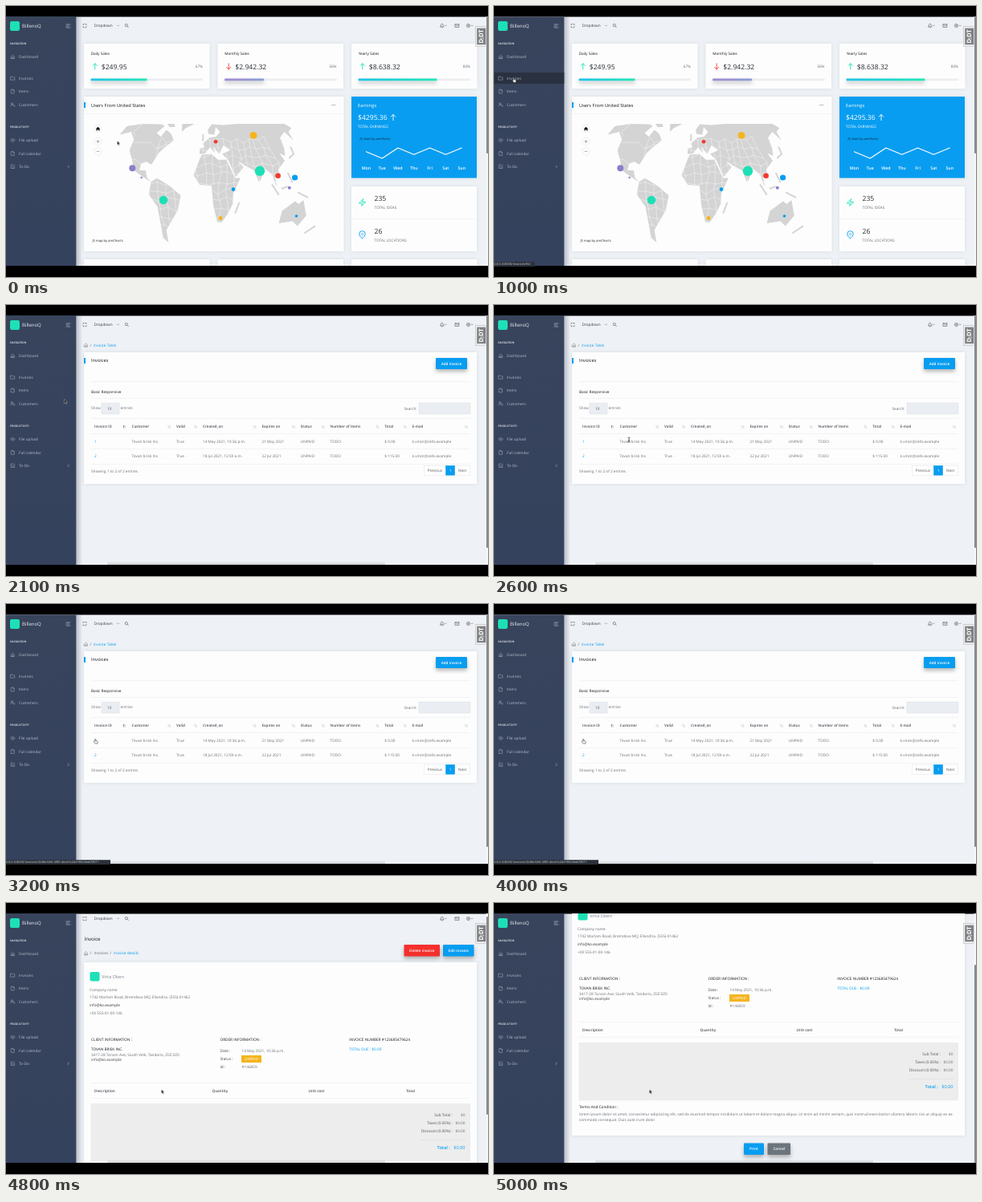
Animation of 600x338 px, one loop 5100 ms. Source, as an HTML page:

```html
<!DOCTYPE html>
<html lang="en">
<head>
<meta charset="utf-8">
<title>Invoice dashboard</title>
<style>
html, body { margin: 0; width: 100%; height: 100%; overflow: hidden; background: #000; }
svg { display: block; width: 600px; height: 338px; font-family: "Open Sans", "Noto Sans", sans-serif; text-rendering: geometricPrecision; }
text { white-space: pre; }
.anim { animation: 5100ms step-end infinite; }
.glow { filter: drop-shadow(0 3px 2.5px rgba(0, 0, 0, .28)); }
.card { filter: drop-shadow(0 .5px 2.5px rgba(69, 90, 100, .12)); }
#top { animation-name: top; }
#scroll { animation-name: scroll; }
#bar { animation-name: bar; }
#pointer { animation-name: move; }
@keyframes top {
  0% { transform: none } 94.117% { transform: translateY(-5px) }
  96.078% { transform: translateY(-43px) } 98.039%, 100% { transform: translateY(-81px) }
}
@keyframes scroll {
  0% { transform: translateY(5px) } 94.117% { transform: none }
  96.078% { transform: translateY(-38px) } 98.039%, 100% { transform: translateY(-76px) }
}
@keyframes bar {
  0% { transform: none } 94.117% { transform: translateY(4px) }
  96.078% { transform: translateY(34px) } 98.039%, 100% { transform: translateY(64px) }
}
@keyframes move {
  0% { transform: translate(138.5px, 168.3px); animation-timing-function: steps(6) }
  11.764% { transform: translate(25px, 92.3px) }
  37.254% { transform: translate(25px, 92.3px); animation-timing-function: steps(6) }
  49.019% { transform: translate(168px, 168px) }
  50.98% { transform: translate(168px, 168px); animation-timing-function: steps(4) }
  58.823% { transform: translate(111.5px, 171px) }
  86.274% { transform: translate(111.5px, 171px); animation-timing-function: steps(4) }
  94.117%, 100% { transform: translate(193.5px, 232.6px) }
}
</style>
</head>
<body>
<svg id="stage" viewBox="0 0 600 338"></svg>
<script>
const LOOP = 5100, BODY = 4.72;
const BLUE = "#089df0", TEAL = "#1de0b6", RED = "#f23a2f", VIOLET = "#8e7cc9", GOLD = "#f4b41f";
const INK = "#15181d", GREY = "#6a6f77", PALE = "#e6e8ec", DARK = "#4b5058";
const BOLD = 'font-weight="600"', MID = 'text-anchor="middle"', END = 'text-anchor="end"';

// y is the middle of the capitals
const text = (x, y, s, fill = GREY, size = BODY, extra = "") =>
  `<text x="${x}" y="${(y + size * .355).toFixed(2)}" font-size="${size}" fill="${fill}" ${extra}>${s}</text>`;
const rect = (x, y, w, h, fill, extra = "") =>
  `<rect x="${x}" y="${y}" width="${w}" height="${h}" fill="${fill}" ${extra}/>`;
const line = (d, color, w = .6, extra = "") =>
  `<path d="${d}" fill="none" stroke="${color}" stroke-width="${w}" stroke-linecap="round" stroke-linejoin="round" ${extra}/>`;
const dot = (x, y, r, fill, extra = "") => `<circle cx="${x}" cy="${y}" r="${r}" fill="${fill}" ${extra}/>`;
const ring = (x, y, r, color) => dot(x, y, r, "none", `stroke="${color}" stroke-width=".6"`);
const each = (list, draw) => list.map(draw).join("");
const rule = (y, x = 106, end = 578) => rect(x, y, end - x, .5, PALE);
const card = (x, y, w, h, fill = "#fdfdfd") => rect(x, y, w, h, fill, 'class="card"');
const group = (id, s) => `<g id="${id}" class="anim">${s}</g>`;
const button = (x, y, w, h, s, fill) =>
  rect(x, y, w, h, fill, 'rx=".8" class="glow"') + text(x + w / 2, y + h / 2, s, "#fff", 4.6, `${MID} ${BOLD}`);
const arrow = (x, y, up, color) => {
  const k = up ? 1 : -1;
  return line(`M${x} ${y + 3.6 * k}V${y - 3.6 * k}M${x - 2.7} ${y - .9 * k}l2.7 ${-2.7 * k}l2.7 ${2.7 * k}`, color, .9);
};
const home = (x, y, c) => line(`M${x - 2} ${y - .3}l2 -1.9l2 1.9v2.5h-4zM${x - .6} ${y + 2.2}v-1.8h1.2v1.8`, c, .5);
const caret = x => line(`M${x - 1} 24l1 1l1 -1`, GREY);
const bigNumber = (x, y, s, fill = "#2a2e35") => text(x, y, s, fill, 8.6);
const scrollbar = h => rect(597.6, 13, 2.4, 312, "#f6f7f9") + group("bar", rect(598, 13, 2, h, "#85888e", 'rx=".9"'));

// visible spans in ms
const spans = {
  dash: [0, 1500], list: [1500, 4500], raw: [1500, 2000], grid: [2000, 4500], detail: [4500, LOOP],
  edge: [1500, LOOP], tool: [0, 1500, 2000, LOOP], hover: [500, 1500], url1: [600, 1500], url2: [3000, 4500],
  arrow: [0, 500, 2000, 2400, 4500, LOOP], hand: [500, 2000, 2900, 4500], beam: [2400, 2900]
};
const showRule = ([id, times]) => {
  const stops = each(times, (t, i) => `${Math.max(0, t / LOOP * 100 - .001).toFixed(3)}% { visibility: ${i % 2 ? "hidden" : "visible"} }`);
  return `#${id} { animation-name: ${id} } @keyframes ${id} { 0% { visibility: hidden } ${stops} }`;
};
document.head.appendChild(document.createElement("style")).textContent = each(Object.entries(spans), showRule);

// sidebar
const folder = "M-2.4 -2h2l.8 .9h2v3.3h-4.8z";
const sheet = "M-1.8 -2.4h2.3l1.3 1.3v3.5h-3.6zM.5 -2.4v1.3h1.3";
const people = "M-2.8 2q0 -2 2 -2q2 0 2 2M-1.9 -1.2a1.1 1.1 0 1 0 2.2 0a1.1 1.1 0 1 0 -2.2 0M1.6 .2q1.2 .3 1.2 1.8";
const cloud = "M-1.8 1q-1.4 -.5 -.6 -2q.9 -1.6 2.6 -.6q1.9 -.4 2.3 1.2q.2 1.1 -.8 1.4M0 2.3v-2.6m-1 .9l1 -1l1 1";
const check = "M2.2 0v2h-4.4v-4.4h3M-1.2 -.4l1.2 1.2l2.6 -2.8";
const menu = [["Invoices", 90, folder], ["Items", 106.5, sheet], ["Customers", 123, people],
  ["File upload", 167.5, cloud], ["Full calendar", 184, sheet], ["To-Do", 200.5, check]];
const side = rect(0, 13, 87.3, 312, "url(#sideFill)") + group("hover", rect(0, 83, 87.3, 14, "#2a3140")) +
  rect(5, 19, 12, 12, TEAL, 'rx="2.2"') + text(20, 25, "BillenoQ", "#e9ecf2", 6) +
  line("M75 23h5M75 25h3.4M75 27h5", "#c3c9d6") +
  text(5, 47.3, "NAVIGATION", "#eef0f5", 3.35, BOLD) + text(5, 151.3, "PRODUCTIVITY", "#eef0f5", 3.35, BOLD) +
  home(8.4, 63.3, "#a9b2c3") + text(16, 63.5, "Dashboard", "#b4bccb") +
  each(menu, ([s, y, icon]) => line(icon, "#a9b2c3", .5, `transform="translate(8.4 ${y})"`) + text(16, y, s, "#b4bccb")) +
  line("M77 199.2l1.3 1.3l-1.3 1.3", "#b4bccb");

const header = line("M96 23.6v-1.1h1.2M98.8 22.5h1.2v1.1M100 25.6v1.1h-1.2M97.2 26.7h-1.2v-1.1", "#555") +
  text(109.5, 24.5, "Dropdown", "#3c4047") + ring(149.8, 24, 1.6, "#555") + line("M151 25.4l1.4 1.4", "#555") +
  line("M540.6 25.7q.8 -.6 .8 -2q.1 -1.5 1.3 -1.5q1.2 0 1.3 1.5q0 1.4 .8 2zM542.2 26.7h1", "#555") +
  line("M559.3 22.8h4.6v3.6h-4.6zl2.3 2l2.3 -2", "#555") +
  ring(575.5, 24.5, 2.1, "#555") + ring(575.5, 24.5, .7, "#555") + each([139.5, 547.2, 580.2], caret);

// world map: key points are longitude, latitude; the top edge is cut flat
const place = (lon, lat) => {
  const bend = 1 - .27 * (lat / 60) ** 2;
  return (248 + .87 * lon * bend).toFixed(1) + " " + Math.max(147, 229 - 1.2 * lat).toFixed(1);
};
const trace = s => "M" + s.split(" ").map(p => place(...p.split(",").map(Number))).join("L");
const land = [
  "-166,66 -141,70 -95,68 -86,66 -94,59 -82,55 -78,62 -65,58 -56,51 -66,45 -75,38 -81,26 -90,29 -97,27 -97,20 -88,20 -84,12 -78,8 -92,14 -105,20 -113,31 -124,41 -128,52 -145,60 -162,57",
  "-85,70 -70,70 -63,65 -75,65", "-52,70 -24,70 -40,64 -46,60",
  "-78,8 -70,12 -51,4 -35,-6 -41,-22 -54,-34 -64,-42 -68,-55 -74,-50 -70,-18 -81,-5",
  "-6,36 10,37 20,31 33,31 43,12 51,12 40,-4 40,-15 34,-25 26,-34 19,-34 12,-17 9,4 -8,5 -17,15 -10,29",
  "-9,37 -9,43 -1,44 -4,48 8,54 20,55 29,60 22,65 17,57 6,58 5,62 14,68 40,67 73,72 179,70 178,64 163,60 157,51 155,60 137,54 131,43 41,41 31,46 22,37 13,45 16,38 8,44 -1,37",
  "131,43 126,35 119,38 122,30 108,21 109,12 101,13 103,2 97,16 88,22 80,10 77,8 72,20 57,26 50,30 57,23 44,13 36,30 27,37 41,41",
  "114,-22 130,-12 136,-15 142,-11 153,-27 148,-38 136,-33 116,-35"
];
const islands = ["45,-24 49,-14", "-4,51 -4,57", "131,33 141,37 143,44", "96,5 105,-5", "110,1 117,3", "121,17 125,8", "133,-3 147,-8", "168,-45 176,-38"];
const shape = each(land, s => trace(s) + "Z");

// country borders: a jittered lattice clipped to the land
const noise = n => (Math.sin(n * 127.1) * 43758.5 % 1) * 3.4;
const node = (i, j) => place(-78 + 11 * i + noise(i * 17 + j * 5 + 1), -38 + 9 * j + noise(i * 7 + j * 23 + 2));
const range = n => [...Array(n).keys()];
const lattice = each(range(18), i => "M" + range(11).map(j => node(i, j)).join("L")) +
  each(range(11), j => "M" + range(18).map(i => node(i, j)).join("L")) +
  trace("-126,49 -95,49 -82,43 -66,47") + trace("-117,32 -107,31 -97,26") + trace("-141,70 -141,60 -130,56");
const bubbles = [[157.3, 202.2, 4, VIOLET], [168.6, 214, 1.2, VIOLET], [196, 242, 5.3, TEAL], [267, 264.6, 2.5, GOLD],
  [283, 228.7, 2.4, BLUE], [316, 205.8, 6.2, TEAL], [338.6, 211.8, 3.3, RED], [359.6, 214, 3.6, BLUE],
  [352.8, 226.8, 2, VIOLET], [361.5, 262, 1.8, BLUE], [261, 169.2, 2.4, RED], [308, 161.4, 4.5, GOLD]];
const map = card(97, 113, 323.5, 193) + rect(97, 120, 2, 7, BLUE) + text(106, 123.5, "Users From United States", INK, 5.7) +
  each(range(3), i => dot(405.8 + 1.8 * i, 123.6, .5, "#666")) + rule(134, 97, 420) +
  `<path d="${shape}" fill="#d4d4d4"/>` + line(lattice, "#fff", .4, 'clip-path="url(#land)"') +
  line(each(islands, trace), "#d4d4d4", 2) + each(bubbles, b => dot(...b)) +
  each([153, 169, 181.3], y => dot(114.5, y, 4.6, "#fff", 'stroke="#d8d8d8" stroke-width=".5"')) +
  `<path d="M111.8 153.2l2.7 -2.5l2.7 2.5h-.8v2.3h-1.3v-1.6h-1.2v1.6h-1.3v-2.3z"/>` +
  line("M112.8 169h3.4M114.5 167.3v3.4M112.8 181.3h3.4", "#777") + text(107.5, 292.3, "JS map by amCharts", "#222", 4.1);

// dashboard
const sale = (x, title, sum, percent, up, share, color, fill) => card(x, 47, 156.5, 56) +
  text(x + 8.7, 59.2, title, INK) + arrow(x + 13.7, 75.4, up, color) +
  bigNumber(x + 21.8, 75.5, sum) + text(x + 148, 75.5, percent, GREY, BODY, END) +
  rect(x + 8.7, 90.6, 139.5, 2.7, "#ecedf1", 'rx=".6"') +
  rect(x + 8.7, 90.6, 139.5 * share, 2.7, fill, 'rx=".6" class="glow"');
const dayX = i => 448.4 + i * 19.8;
const dayY = i => 181 + (i % 2 ? 4.2 : -4) + (i < 2 ? 4.8 : 0);
const earnings = card(430, 113, 156, 101.5, BLUE) + text(438, 123.5, "Earnings", "#fff", 5.75) +
  bigNumber(438, 139.3, "$4295.36", "#fff") + arrow(482, 139, true, "#fff") +
  text(438, 150.5, "TOTAL EARNINGS", "#fff") + text(440.5, 165.5, "JS chart by amCharts", "#123", 3.95) +
  line("M" + range(7).map(i => `${dayX(i)} ${dayY(i)}`).join("L"), "#fff", 1.1) +
  each(["Mon", "Tue", "Wed", "Thu", "Fri", "Sat", "Sun"], (d, i) => text(dayX(i), 202.2, d, "#fff", 5.3, `${MID} ${BOLD}`));
const totals = card(430, 225, 156, 81) + rule(265, 430, 586) +
  line("M444.4 240.8l-5 5.2h4l-.7 3.6l5 -5.2h-4z", TEAL, .9) +
  line("M443.5 290q-3.8 -3.2 -3.8 -5.6a3.8 3.8 0 0 1 7.6 0q0 2.4 -3.8 5.6", BLUE, .9) + ring(443.5, 284.6, 1.3, BLUE) +
  each([["235", "TOTAL IDEAS"], ["26", "TOTAL LOCATIONS"]], ([n, s], i) =>
    bigNumber(458.5, 240.3 + i * 40.7, n) + text(458.5, 251.7 + i * 40.7, s));
const dash = sale(97, "Daily Sales", "$249.95", "67%", true, .5, TEAL, "url(#tealFill)") +
  sale(263.5, "Monthly Sales", "$2.942.32", "36%", false, .35, RED, "url(#violetFill)") +
  sale(430, "Yearly Sales", "$8.638.32", "80%", true, .7, TEAL, "url(#tealFill)") +
  map + earnings + totals + each(range(3), i => card(97 + 166.5 * i, 316, 156.5, 20)) + scrollbar(171);

// invoice list: head, two cells, left edge before and after the table is enhanced
const columns = [
  ["Invoice ID", "1", "2", 110, 110],
  ["Customer", "Tovan brisk Inc.", "Tovan brisk Inc.", 151, 156.5],
  ["Valid", "True", "True", 209.3, 212],
  ["Created_on", "14 May 2021, 10:36 p.m.", "18 Jul 2021, 12:59 a.m.", 236, 245],
  ["Expires on", "21 May 2021", "22 Jul 2021", 319, 318.5],
  ["Status", "UNPAID", "UNPAID", 367.5, 366.8],
  ["Number of items", "TODO", "TODO", 402.3, 403.6],
  ["Total", "$ 0.00", "$ 115.00", 465.5, 471.3],
  ["E-mail", "k.viron@cells.example", "k.viron@cells.example", 502, 505.6]
];
const table = (y, edge, order) => each(range(4), i => rule(y - 9.7 + 18.9 * i)) + each(columns, (c, n) =>
  text(c[edge], y, c[0], DARK, 4.6, BOLD) +
  each(order, (k, i) => text(c[edge], y + 18.7 * (i + 1), c[k], n ? GREY : BLUE)));
const sorter = (c, i) => {
  const x = (columns[i + 1] ? columns[i + 1][4] : 582) - 9;
  return line(`M${x - .9} 153.3v-3m-.7 .8l.7 -.8l.7 .8`, i ? "#c4c8ce" : "#444", .5) +
    line(`M${x + 1.1} 150.4v3m-.7 -.8l.7 .8l.7 -.8`, "#c4c8ce", .5);
};
const field = (x, w) => rect(x, 122.2, w, 13.8, "#eaeef3", 'stroke="#d5dae1" stroke-width=".5" rx=".6"');
const pager = (x, w, s, on) => rect(x, 200.4, w, 11.8, on ? BLUE : "#fff", `stroke="${on ? BLUE : "#dfe3e8"}" stroke-width=".5"`) +
  text(x + w / 2, 206.5, s, on ? "#fff" : "#555", 4.65, MID);
const raw = card(97, 59, 489, 134.5) + table(131.8, 3, [2, 1]);
const grid = card(97, 59, 489, 164) + table(151.2, 4, [1, 2]) + each(columns, sorter) +
  text(106, 128.7, "Show") + field(119, 22) + text(126, 129.2, "10", "#555") + text(142.6, 128.7, "entries") +
  text(495.5, 129, "Search:") + field(514, 64) + text(106, 207.5, "Showing 1 to 2 of 2 entries") +
  pager(520.5, 27, "Previous") + pager(558.5, 19, "Next") + pager(547.5, 11, "1", true);
const crumb = y => home(99.5, y, "#777") + text(104.6, y, "/", "#555");
const list = crumb(50) + text(109, 50, "Invoice Table", BLUE) + group("raw", raw) + group("grid", grid) +
  rect(97, 66, 2, 7, BLUE) + text(106, 69, "Invoices", INK, 5.7) + button(535, 66, 39, 14, "Add invoice", BLUE) +
  rule(95) + text(106, 108.2, "Basic Responsive", INK) + rule(116.3) + scrollbar(290);

// invoice details
const lorem = ["lorem ipsum dolor sit amet, consectetur adipisicing elit, sed do eiusmod tempor incididunt ut labore et dolore magna aliqua. Ut enim ad minim veniam, quis nostrud exercitation ullamco laboris nisi ut aliquip ex ea",
  "commodo consequat. Duis aute irure dolor"];
const order = [["Date :", "14 May 2021, 10:36 p.m."], ["Status :", ""], ["Id :", "#146859"]];
const sums = [["Sub Total :", "$0"], ["Taxes (0.05%) :", "$0.00"], ["Discount (0.00%) :", "$0.00"]];
const detail = text(97.5, 45, "Invoice", INK, 6.1) + crumb(62.6) +
  text(109.5, 62.6, "Invoices") + text(129.3, 62.6, "/", "#555") + text(134, 62.6, "Invoice details", BLUE) +
  button(495.5, 52, 44.5, 14.5, "Delete invoice", "#f4302c") + button(544, 52, 38.5, 14.5, "Edit invoice", BLUE) +
  card(97, 74, 489, 292) + rect(104.5, 86, 12, 11.6, TEAL, 'rx="2"') + text(119, 92.2, "Virta Oben", "#7d8590", 5.6) +
  each(["Company name", "1742 Marlom Road, Bremdova MQ, Ellandria. (555)-01462", "info@ko.example", "+00 555-01-00-146"],
    (s, i) => text(104, 108 + 9.7 * i, s, i === 2 ? "#333" : GREY)) +
  each([["CLIENT INFORMATION :", 106], ["ORDER INFORMATION :", 266.5], ["INVOICE NUMBER #123685479624", 427.3]],
    ([s, x]) => text(x, 170.2, s, INK)) +
  text(106, 182.4, "TOVAN BRISK INC.", INK) + text(106, 189, "3417-28 Tarvon Ave, South Velk, Tandario, Z0Z 0Z0") +
  text(106, 195.7, "info@ko.example", "#444") +
  each(order, ([s, v], i) => text(266.5, 184.6 + 9.9 * i, s, "#444") + text(293.5, 184.6 + 9.9 * i, v)) +
  rect(293, 190, 25, 9, GOLD) + text(305.5, 194.5, "UNPAID", "#fff", 4.5, MID) +
  text(427.3, 182.4, "TOTAL DUE : $0.00", BLUE) + rule(224.3) + rule(243.3) +
  each([["Description", 110], ["Quantity", 256.5], ["Unit cost", 376.5], ["Total", 498]], ([s, x]) => text(x, 234.2, s, DARK, 4.65, BOLD)) +
  rect(105.5, 250, 472.5, 72.3, "#ededed") +
  each(sums, ([s, v], i) => text(555.8, 264.3 + 9.8 * i, s, DARK, BODY, END) + text(571.5, 264.3 + 9.8 * i, v, GREY, BODY, END)) +
  rect(516, 295, 56, .5, "#d4d6da") + text(552.8, 304.8, "Total :", BLUE, 5.6, `${END} ${BOLD}`) + text(571.5, 304.8, "$0.00", BLUE, 5.6, END) +
  text(106, 330.3, "Terms And Condition :", INK) + each(lorem, (s, i) => text(106, 339.7 + i * 6.8, s)) +
  button(311, 375.6, 25, 14.4, "Print", BLUE) + button(340.5, 375.6, 28.5, 14.4, "Cancel", "#6c757d");

// overlays
const tool = rect(584, 25.3, 13.2, 25.2, "#b5b6b8") + rect(584.6, 25.9, 12.6, 24, "#f4f4f5") + rect(586.2, 27.6, 11, 20.6, "#7f8184") +
  `<text transform="translate(594.3 37.9) rotate(-90)" ${MID} font-size="7.6" font-weight="700" fill="#fff">D<tspan font-size="5.6" fill="#d5dad7">J</tspan>DT</text>`;
const bubble = (w, s) => rect(0, 319.2, w, 5.8, "#2b3039") + text(-.4, 322, s, "#d0d3d8", 4);
const pointer =
  group("arrow", `<path d="M0 0v5l1.2 -1l.8 1.8l.9 -.4l-.8 -1.8h1.5z" stroke="#fff" stroke-width=".4"/>`) +
  group("hand", `<path d="M-.9 .4v-2.6q.6 -.7 1.1 0v1.7l2 .5q.6 .3 .4 1.2l-.4 1.9h-2.6l-2 -2.4q.4 -.9 1.5 -.3z" fill="#fff" stroke="#111" stroke-width=".5"/>`) +
  group("beam", line("M-1.2 -2.8q1.2 0 1.2 .7v4.2q0 .7 -1.2 .7M1.2 -2.8q-1.2 0 -1.2 .7M0 2.1q0 .7 1.2 .7M-.7 .6h1.4", "#222"));

const fade = (id, a, b, down) => `<linearGradient id="${id}" ${down ? 'x2="0" y2="1"' : ""}><stop stop-color="${a}"/><stop offset="1" stop-color="${b}"/></linearGradient>`;
document.getElementById("stage").innerHTML =
  `<defs>${fade("tealFill", "#1dc4e9", "#1de9b6")}${fade("violetFill", "#a389d4", "#899fd4")}
  ${fade("sideFill", "#38445c", "#35425d", true)}${fade("shade", "rgba(50,62,90,.3)", "rgba(50,62,90,0)")}
  ${fade("foot", "rgba(70,90,80,0)", "rgba(70,90,80,.22)", true)}
  <clipPath id="land"><path d="${shape}"/></clipPath>
  <clipPath id="view"><rect y="13.5" width="600" height="310.4"/></clipPath></defs>` +
  rect(0, 0, 600, 338, "#000") +
  `<g clip-path="url(#view)">` + rect(0, 13, 600, 312, "#eef1f5") + rect(87, 13, 8, 312, "url(#shade)") +
  group("top", header) + group("dash", dash) + group("list", list) +
  group("detail", group("scroll", detail) + scrollbar(247)) +
  group("edge", rect(126, 320, 346, 4.3, "url(#foot)")) + side + group("tool", tool) + `</g>` +
  group("url1", bubble(50.5, "0.0.0.0:8000/invoices/list")) +
  group("url2", bubble(130, "0.0.0.0:8000/invoices/2b86c684-40f0-4ea3-b2d4-98c0ea6f3011")) +
  group("pointer", pointer);
</script>
</body>
</html>
```
